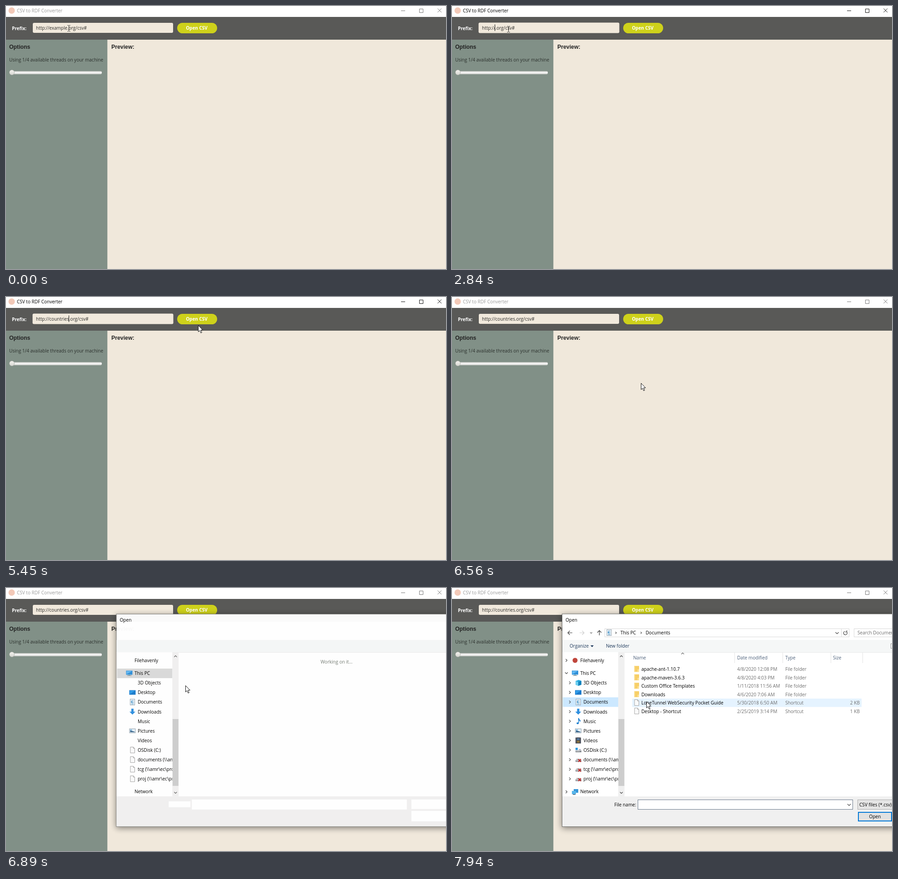
Recreate the animation shown at these times as an HTML page. Size 969x578 px, loop 8 s.

```html
<!DOCTYPE html>
<html lang="en">
<head>
<meta charset="utf-8">
<title>CSV to RDF Converter</title>
<style>
html, body { margin: 0; width: 100%; height: 100%; overflow: hidden; background: #f0e8db; }
svg { display: block; width: 969px; height: 578px; }
text { font: 10px "Open Sans", "Noto Sans", sans-serif; white-space: pre; }
.bold { font-weight: bold; }
.head { font: bold 12.3px "Liberation Sans", Arial, sans-serif; }
.group { font-size: 12.7px; }
.dialog text { font-size: 10.1px; }
.dialog text.group { font-size: 12.7px; }
</style>
</head>
<body>
<svg id="stage" viewBox="0 0 969 578">
  <defs>
    <linearGradient id="track" x2="0" y2="1">
      <stop stop-color="#b9bcb7"/><stop offset=".45" stop-color="#fff"/><stop offset="1" stop-color="#c4c6c2"/>
    </linearGradient>
    <linearGradient id="thumb" x2="0" y2="1">
      <stop stop-color="#f4f3ef"/><stop offset="1" stop-color="#d6d6d1"/>
    </linearGradient>
  </defs>
  <g id="view"></g>
</svg>
<script>
const LOOP = 8000, raw = String.raw;
const view = document.getElementById('view');
const ruler = document.createElement('canvas').getContext('2d');
const widthOf = s => { ruler.font = '10px "Open Sans", "Noto Sans", sans-serif'; return ruler.measureText(s).width; };
const clamp = v => Math.max(0, Math.min(1, v));

const text = (x, y, s, fill = '#000', more = '') => `<text x="${x}" y="${y}" fill="${fill}" ${more}>${s}</text>`;
const rect = (x, y, w, h, fill, more = '') => `<rect x="${x}" y="${y}" width="${w}" height="${h}" fill="${fill}" ${more}/>`;
const line = (d, stroke = '#333', w = 1, more = '') => `<path d="${d}" fill="none" stroke="${stroke}" stroke-width="${w}" ${more}/>`;
const shape = (d, fill, more = '') => `<path d="${d}" fill="${fill}" ${more}/>`;
const box = (x, y, w, h, fill, stroke) => rect(x + .5, y + .5, w - 1, h - 1, fill, `stroke="${stroke}"`);
const at = (x, y, s) => `<g transform="translate(${x} ${y})">${s}</g>`;
const chevron = (x, y, turn = 0, color = '#444', r = 3) =>
  `<g transform="translate(${x} ${y}) rotate(${turn})">${line(`M${-r} ${-r / 2}L0 ${r / 2}L${r} ${-r / 2}`, color, 1.1)}</g>`;

// [time, host before caret, host after caret]
const edits = [
  [0, 'exam', 'ple'], [870, 'exam', 'ple'], [1870, 'exa', 'ple'], [2020, 'ex', 'ple'], [2150, 'e', 'ple'],
  [2300, '', 'ple'], [2530, '', 'le'], [2710, '', 'e'], [2840, '', ''],
  ...[3500, 3700, 3810, 3910, 4020, 4200, 4280, 4360, 4430].map((t, i) => [t, 'countries'.slice(0, i + 1), ''])
];

// [time, x, y] of the pointer
const path = [
  [0, 138, 49], [590, 138, 49], [670, 120, 54], [870, 120, 54], [950, 124, 51], [4890, 124, 51],
  [5450, 423, 62], [5630, 423, 60], [5810, 421, 52], [6330, 421, 52], [6560, 416, 189],
  [6890, 395, 214], [6980, 390, 218], [7130, 390, 218], [7310, 315, 236], [7540, 318, 250],
  [7730, 318, 250], [7940, 428, 249], [LOOP, 428, 249]
];

function pointerAt(t) {
  const i = path.findIndex(p => p[0] > t), [t0, x0, y0] = path[i - 1], [t1, x1, y1] = path[i];
  const k = (t - t0) / (t1 - t0);
  return [x0 + (x1 - x0) * k, y0 + (y1 - y0) * k];
}

const cursors = {
  beam: line('M-3 -6.5H-1L0 -5.5L1 -6.5H3M0 -5.5V5.5M-3 6.5H-1L0 5.5L1 6.5H3', '#222'),
  arrow: shape('M.5 .5V14.5L3.7 11.5L6 17L8.3 16L6 10.7H10.3Z', '#fff', 'stroke="#111"'),
  hand: shape('M-1.5 1.5Q0 -1 1.5 1.5V7Q3 5.5 4 7.5Q6 6.500 6.500 8.500Q9 7.500 9 10V14Q9 16 7 19H-1Q-2 16 -5.500 12Q-6 9.500 -4 10L-1.500 12Z', '#fff', 'stroke="#111"')
    + line('M1.5 7V10M4 8V10.500M6.500 9V11', '#111', .8)
};

// Small icons, centred on the origin
const monitor = rect(-7, -5.5, 14, 9, '#2f8fd8') + shape('M-6 -4.5H6L-6 2.5Z', '#62b8f2')
  + rect(-2, 3.5, 4, 2, '#8aa') + rect(-5, 5, 10, 1, '#789');
const page = shape('M-4.5 -6.5H2L5 -3.500V6.500H-4.500Z', '#fbfbfb', 'stroke="#999" stroke-width=".9"')
  + line('M2 -6.500V-3.500H5', '#999', .9);
const drive = rect(-6, 1, 13, 4, '#8b9095') + rect(-5, 2, 8, 1, '#ddd');
const netDrive = drive + rect(-4, -2, 9, 3, '#b5b9bc') + line('M0 -1L6 5M6 -1L0 5', '#c8201e', 1.9);
const icons = {
  monitor, page, netDrive,
  ball: '<circle r="5.5" fill="#c0463c"/>',
  cube: shape('M-6 -4L1 -6.500L7 -4.500V4L0 6.500L-6 4Z', '#25a8dc') + shape('M-6 -4L0 -2V6.500L-6 4Z', '#6fd0f1') + shape('M0 -2L7 -4.500V4L0 6.500Z', '#1483bd'),
  desktop: rect(-7, -5, 14, 10, '#1979ca') + shape('M-6 -4H6L-6 4Z', '#2f9be8'),
  doc: rect(-5, -6.5, 10, 13, '#fff', 'stroke="#7f93a3" stroke-width=".9"') + line('M-3 -3.500H3M-3 -.5H3M-3 2H3M-3 4.500H3', '#3c8dc4') + rect(-3, -2, 2.500, 3, '#3c8dc4'),
  down: shape('M-2.500 -6.500H2.500V0H6.500L0 6.500L-6.500 0H-2.500Z', '#2e8fdf'),
  music: shape('M0 -7H1.500Q2 -4 5 -2Q5.500 0 3.500 2Q4 -1 1.500 -2V4Q1 7 -2 6.500Q-5 5 -3 3Q-1.500 2 0 3Z', '#1d7fd0'),
  picture: rect(-6.5, -4.5, 13, 9, '#e8f3fa', 'stroke="#8796a2" stroke-width=".9"') + shape('M-5 3V-1L-1 0L5 2V3Z', '#315f86') + rect(-5, -3, 4, 2, '#6ab1e0'),
  film: rect(-6, -6.5, 12, 13, '#303440') + rect(-3, -5, 6, 4.500, '#55779a') + rect(-3, .5, 6, 4.500, '#8b7440') + line('M-4.500 -6V6M4.500 -6V6', '#ccc', 1, 'stroke-dasharray="1.500 1.500"'),
  disk: drive + rect(-6, -5, 5, 5, '#2f9be0') + rect(1, -2, 5, 2, '#aab'),
  network: rect(-3, -6, 10, 8, '#3596d8') + rect(-7, -2, 9, 7, '#58b6ea') + rect(-5, 5, 6, 1.500, '#567'),
  folder: rect(-5.5, -6.5, 11, 13, '#f7cf68') + rect(-5.5, -6.5, 2, 13, '#fbe29a') + rect(2, 1, 3.500, 5.500, '#fbe29a')
};

// [label, icon, icon while loading]
const places = [
  ['3D Objects', 'cube'], ['Desktop', 'desktop', 'desktop'], ['Documents', 'doc', 'doc'], ['Downloads', 'down', 'down'],
  ['Music', 'music'], ['Pictures', 'picture', 'picture'], ['Videos', 'film'], ['OSDisk (C:)', 'disk', 'page'],
  [raw`documents (\\amr`, 'netDrive', 'page'], [raw`tcg (\\amr\ec\pro`, 'netDrive', 'page'], [raw`proj (\\amr\ec\pr`, 'netDrive', 'page']
];
const files = [
  ['apache-ant-1.10.7', '4/8/2020 12:08 PM'], ['apache-maven-3.6.3', '4/8/2020 4:03 PM'],
  ['Custom Office Templates', '1/11/2018 11:56 AM'], ['Downloads', '4/6/2020 7:06 AM'],
  ['LoneTunnel WebSecurity Pocket Guide', '5/30/2018 6:50 AM', '2 KB'], ['Desktop - Shortcut', '2/25/2019 3:14 PM', '1 KB']
];

function mainWindow(t) {
  const active = t >= 360 && t < 6000, focus = t >= 360 && t < 5630, selected = t >= 360 && t < 870;
  const ink = active ? '#000' : '#999', tool = active ? '#111' : '#777';
  const [since, before, after] = edits.filter(e => e[0] <= t).pop();
  const left = 'http://' + before, url = left + after + '.org/csv#';
  const caretX = Math.round(66 + widthOf(left)) - .5;
  const caret = focus && t >= 870 && (t - since) % 1000 < 500;
  return rect(0, 0, 969, 24, '#fff') + '<circle cx="12.500" cy="10" r="7" fill="#f3c9b8"/>'
    + text(24, 14, 'CSV to RDF Converter', ink)
    + line('M870 10.500H879M910.500 6.500H918.500V14.500H910.500ZM950.500 5.500L959 14M959 5.500L950.500 14', tool)
    + rect(0, 24, 969, 50, '#595957')
    + text(13, 53, 'Prefix:', '#fff', 'class="bold"')
    + (focus ? rect(58.5, 36.5, 310, 23, '#f1e9dc', 'rx="3"') : rect(59, 37, 309, 22, '#f1e9dc', 'rx="3"'))
    + (selected ? rect(66, 40, widthOf(url), 15, '#0096c9') : '')
    + text(66, 52, url, selected ? '#fff' : '#2b2b28')
    + (caret ? line(`M${caretX} 40.500V55`, '#111') : '')
    + rect(377, 37, 88, 23, '#ced11b', 'rx="11.500"')
    + text(420, 52, 'Open CSV', '#fff', 'class="bold" text-anchor="middle"')
    + rect(0, 74, 223.5, 504, '#819087') + rect(223.5, 74, 746, 504, '#f0e8db')
    + text(7, 94, 'Options', '#222', 'class="head"') + text(232, 94, 'Preview:', '#222', 'class="head"')
    + text(7, 122, 'Using 1/4 available threads on your machine', '#2b302c')
    + rect(10, 143, 201, 7, 'url(#track)', 'rx="3"')
    + '<circle cx="13" cy="146" r="5.500" fill="url(#thumb)" stroke="#a9aca6" stroke-width=".7"/>';
}

function sidebar(t, full, x, y) {
  const picked = t >= 7540, rowY = i => 177 + 21.1 * i;
  const hover = t >= 7130 && x < 366 ? Math.floor((y - 177) / 21.1) : -1;
  const fade = `opacity="${clamp((t - 7230) / 300)}"`;
  let s = rect(243, 141, 123, 317, '#fff');
  if (hover > 0) s += rect(244, rowY(hover), 122, 21, '#e5f3ff');
  s += picked ? rect(244, rowY(3), 122, 21, '#cce8ff') : rect(244, 177, 122, 21, '#d9d9d9');
  s += at(271, 187, icons.monitor) + text(282.5, 190.7, 'This PC')
    + text(282.5, 162.7, 'Filehavenly') + text(282.5, 451, 'Network');
  if (full) s += at(271, 159, icons.ball) + at(271, 448, icons.network);
  let marks = chevron(252, 159, -90) + chevron(252, 187) + chevron(252, 448, -90);
  places.forEach(([name, icon, early], i) => {
    const cy = rowY(i + 1) + 10.3, kind = full ? icon : early;
    s += (kind ? at(278, cy, icons[kind]) : '') + text(289.5, cy + 3.8, name);
    marks += chevron(259.5, cy, -90);
  });
  return s + `<g ${fade}>${marks}</g>` + rect(366, 141, 14, 317, '#f0f0f0') + rect(366.5, 288, 13, 147, '#cdcdcd')
    + chevron(373, 150, 180, '#444', 3) + chevron(373, 450, 0, '#444', 3);
}

function bigPage(x, y, name) {
  return shape(`M${x + .5} ${y + .5}h22l6 6v30h-28Z`, '#f6f6f6', 'stroke="#a0a0a0"')
    + line(`M${x + 22.5} ${y + .5}v6h6`, '#a0a0a0') + text(x + 39.5, y + 14, name);
}

function folderList() {
  const group = (y, name, from) => chevron(394, y, 0, '#1e3287', 4) + text(402, y + 4.5, name, '#1e3287', 'class="group"')
    + line(`M${from} ${y + .5}H969`, '#e2e2e2');
  const names = ['3D Objects', 'Desktop', 'Documents', 'Downloads', 'Music', 'Pictures', 'Videos'];
  return group(158, 'Folders (7)', 472) + group(379, 'Devices and drives (1)', 537) + group(452, 'Network locations (3)', 535)
    + names.map((n, i) => bigPage(406 + 223.5 * (i % 2), 176 + 49.2 * (i >> 1), n)).join('')
    + bigPage(406, 397, 'OSDisk (C:)');
}

function fileList(x, y) {
  const hover = x > 380 ? Math.floor((y - 169) / 18.5) : -1;
  let s = chevron(508, 144, 180, '#666', 3)
    + line('M622.500 142V165M728.500 142V165M834.500 142V165M904.500 142V165', '#e3e3e3');
  [[399, 'Name'], [628, 'Date modified'], [734, 'Type'], [839, 'Size']].forEach(([hx, n]) => s += text(hx, 156.7, n, '#4c607a'));
  files.forEach(([name, date, size], i) => {
    const cy = 178.3 + 18.5 * i;
    if (i === hover) s += rect(397, cy - 9.3, 505, 18.5, '#e5f3ff');
    s += at(406.5, cy - .5, icons[size ? 'page' : 'folder']) + text(417, cy + 3.7, name)
      + text(628, cy + 3.7, date, '#6d6d6d') + text(734, cy + 3.7, size ? 'Shortcut' : 'File folder', '#6d6d6d')
      + text(898, cy + 3.7, size || '', '#6d6d6d', 'text-anchor="end"');
  });
  return s;
}

function toolbar(docs, loaded) {
  const dark = '#444', pale = '#cfcfcf';
  return line('M265 98.500H255M259.500 94L255 98.500L259.500 103', docs ? dark : pale, 1.2)
    + line('M281 98.500H291M286.500 94L291 98.500L286.500 103', pale, 1.2)
    + chevron(306.5, 98.5, 0, docs ? '#666' : pale, 2.2)
    + line('M324.500 104V93.500M320 98L324.500 93.500L329 98', dark, 1.3)
    + box(336, 89, 539, 19, '#fff', '#d9d9d9') + line('M857.500 89V107', '#d9d9d9')
    + (loaded ? at(346, 98, icons[docs ? 'doc' : 'monitor']) + chevron(361, 98.5, -90, dark, 2.2) + text(371, 102, 'This PC') : '')
    + (docs ? chevron(416.5, 98.5, -90, dark, 2.2) + text(426.5, 102, 'Documents') : '')
    + chevron(848, 99, 0, dark, 3.5)
    + line('M869 96A4 4 0 1 1 865 95.200M869.500 93V96.500H866', dark, 1.2)
    + box(885, 89, 200, 19, '#fff', '#d9d9d9')
    + text(893, 102, docs ? 'Search Documents' : 'Search This PC', '#6d6d6d')
    + text(259, 131, 'Organize', '#1e395b') + shape('M305 126H312L308.500 130Z', '#1e395b')
    + (docs ? text(339, 131, 'New folder', '#1e395b') : '')
    + box(966, 122, 12, 11, '#fff', '#999');
}

function footer(docs, t) {
  return text(357.5, 479.7, 'File name:')
    + box(409, 465, 474, 22, '#fff', docs ? '#68778a' : '#0078d7')
    + (!docs && (t - 7000) % 1000 < 500 ? line('M413.500 470V483', '#000') : '') + chevron(874.5, 476.5, 0, '#444', 3.5)
    + box(893, 465, 200, 22, '#e5e5e5', '#adadad') + text(897, 479.7, 'CSV files (*.csv)')
    + rect(895, 493, 73, 19, '#e1e1e1', 'stroke="#0078d7" stroke-width="2"')
    + text(931.5, 506, 'Open', '#000', 'text-anchor="middle"');
}

function dialog(t, x, y) {
  if (t < 6680) return '';
  const ease = 1 - (1 - clamp((t - 6680) / 300)) ** 3, scale = .96 + .04 * ease;
  const full = t >= 6940, loaded = t >= 7130, docs = t >= 7730;
  const list = docs ? fileList(x, y) : loaded ? folderList()
    : text(728, 165.5, 'Working on it...', '#727a72', 'text-anchor="middle"');
  return `<g class="dialog" opacity="${ease}" transform="translate(690 291) scale(${scale}) translate(-690 -291)">`
    + rect(242.5, 57, 895, 467.5, '#fff', 'stroke="#70706c" style="filter:drop-shadow(0 3px 7px #0007)"')
    + text(250, 74, 'Open') + rect(243, 114, 894, 27, '#f5f7f7') + line('M243 141.500H1137', '#e6e8e8')
    + (full ? toolbar(docs, loaded) : '')
    + sidebar(t, full, x, y) + rect(380, 142, 757, 316, '#fff') + list
    + rect(243, 458, 894, 66, '#f0f0f0')
    + (full ? footer(docs, t)
      : rect(358, 469, 48, 13, '#fff') + rect(409, 465, 474, 22, '#fff') + rect(893, 465, 200, 21, '#fff') + rect(893, 490, 200, 23, '#fff'))
    + '</g>';
}

function pointer(t, x, y) {
  const inField = t < 6000 && x < 368 && y < 59, inTree = t >= 7130 && x < 366;
  return at(Math.round(x) + (inField ? .5 : 0), Math.round(y), cursors[inField ? 'beam' : inTree ? 'hand' : 'arrow']);
}

let start;
function frame(now) {
  start ??= now;
  const t = (now - start) % LOOP, [x, y] = pointerAt(t);
  view.innerHTML = mainWindow(t) + dialog(t, x, y) + pointer(t, x, y);
  requestAnimationFrame(frame);
}
requestAnimationFrame(frame);
</script>
</body>
</html>
```
